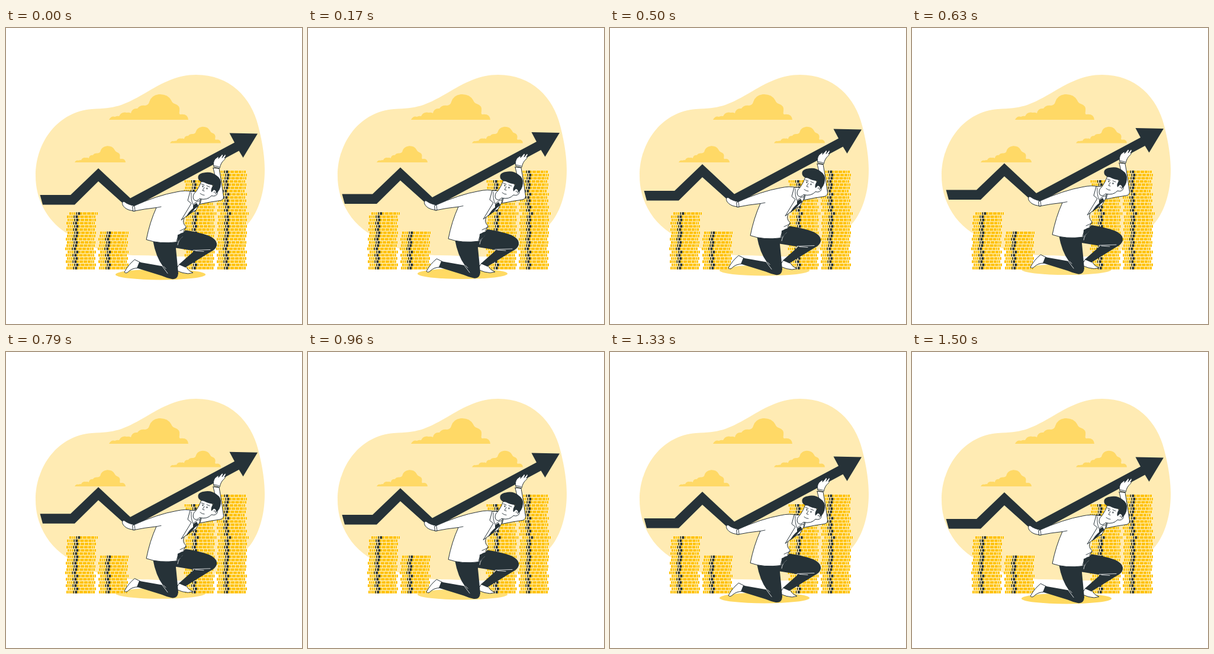
Write an HTML page that moves like this. It is 500 px wide and 500 px high and loops after 1540 ms.

```html
<!DOCTYPE html>
<html lang="en">
<head>
<meta charset="utf-8">
<title>Lifting the chart</title>
<style>
  html, body { margin: 0; width: 100%; height: 100%; overflow: hidden; background: #fff; }
  svg { display: block; width: 100%; height: 100%; }
  .dark { fill: #263238; }
  .skin { fill: #fff; stroke: #263238; stroke-width: 1; stroke-linejoin: round; stroke-linecap: round; }
  .line { fill: none; stroke: #263238; stroke-width: .9; stroke-linecap: round; stroke-linejoin: round; }
  .crease { fill: none; stroke: #fff; stroke-width: .8; stroke-linecap: round; }
</style>
</head>
<body>
<svg viewBox="0 0 500 500">
  <defs>
    <path id="cloud" d="M0 0Q4-7 10-5Q14-7 17-6Q21-14 30-12Q34-13 37-11Q39-20 48-19Q52-25 61-24Q67-25 68-30Q71-41 84-43Q99-44 105-33Q107-28 111-27Q121-24 119-14Q118-10 120-9Q133-11 134 0Z"/>
  </defs>

  <path fill="#ffebb3" d="M50 250C50 190 90 141 145 137C185 135 195 133 235 110C265 92 290 79 321 79C378 79 414 117 426 165C434 196 437 220 437 240C437 280 425 315 405 335C375 365 350 380 320 384C290 389 250 383 215 384C170 383 130 365 100 345C70 325 50 290 50 250Z"/>
  <g fill="#ffd966">
    <use href="#cloud" transform="translate(174 155)"/>
    <use href="#cloud" transform="translate(277 194.5) scale(.642)"/>
    <use href="#cloud" transform="translate(116 227) scale(.642)"/>
  </g>

  <ellipse id="shadow" cx="261" cy="416" rx="76" ry="9" fill="#ffd95f"/>
  <g id="coins"></g>

  <g id="lift">
    <path class="dark" d="M57.500 281.500H109L156 236.500L210 287L386 193L377.500 177L425 178L400.500 218.500L393.500 207L209 306L156 258.500L116 298H62Z"/>

    <!-- legs and feet -->
    <path class="skin" d="M217 391Q206 400 200 412Q203 415 207 411Q213 405 223 405L227 396Z"/>
    <path class="skin" d="M293 399L304 403Q308 410 316 413Q308 416 298 413L287 409Z"/>
    <path class="dark" d="M284 362L303 341Q340 347 349 354Q357 359 356 367Q354 374 345 378L303 404L292 399L318 376L287 371Z"/>
    <path class="dark" d="M248 358H288L287 372Q289 392 291 414Q290 425 280 423.500Q272 422 263 418L221 405L225 395L265 402Q253 386 248 358Z"/>
    <path class="crease" d="M264 402L273 414M266 402L270 406M290 366Q291 358 298 352M316 375L345 374M320 376L334 377"/>

    <!-- raised arm -->
    <path class="skin" d="M351 234Q349 227 353 221L358 217Q360 217 359 220L365 213Q368 213 365 219L370 213Q373 214 369 219Q372 219 368 223Q363 227 361 236Z"/>
    <path class="skin" d="M350 236L360 237Q364 258 367 281Q369 290 362 291Q346 293 328 297L322 283L354 272Q356 258 350 236Z"/>
    <path class="line" d="M350.500 232L360 234"/>

    <!-- jacket and lower arm -->
    <path class="skin" d="M217 300Q206 298 200 293Q196 292 196.500 297Q199 304 208 307L217 309Z"/>
    <path class="skin" d="M214 301Q256 282 288 276.500Q304 273 314 276L330 289L328 296Q313 307 301 320Q297 329 304 335L300 343L302 347L290 361Q259 365 237 357Q243 327 254 303Q234 305 215 309Z"/>
    <path class="line" d="M217 300L218 308.500M254 303L262 301.500M288 361Q289 352 296 346M305 337L294 342"/>
    <path class="dark" d="M290 349L301 344L303 347L289 361Z"/>
    <path class="skin" d="M311 276L307 291L313 296L296 324Q310 313 321 307L327 296L329 285L320 276Z"/>
    <path class="line" d="M313 278Q312 289 316 298L322 293L328 291"/>
    <path class="dark" d="M316 299L322 295L325 300L319 305Q313 313 304 319Q309 309 316 304Z"/>

    <!-- head -->
    <path class="skin" d="M331 256Q327 268 321 276Q314 281 317 289Q321 294 327 288Q340 291 347 283Q355 285 357 279Q358 272 351 271L346 258Z"/>
    <path class="dark" d="M325 255Q322 246 334 244Q347 241 356 249Q364 254 363 264Q362 274 355 279Q355 273 351 273L347 277Q345 272 350 265Q341 264 334 260Q328 260 325 255Z"/>
    <path class="line" d="M330 263L335 265M339 266L344 268M335 269L332 274L335 275M328 279Q331 282 335 282M351 277Q354 275 354 280"/>
    <ellipse class="dark" cx="332.500" cy="267" rx=".9" ry="1.500"/>
    <ellipse class="dark" cx="339.500" cy="270.500" rx=".9" ry="1.500"/>
  </g>
</svg>
<script>
  const LOOP = 1540, PHASE = 35, TRAVEL = 8.8, LOWEST = .5;
  const PITCH = 5.42, BASE = 408, WIDTH = 48, COIN = 4.3;
  const shifts = [0, 2, -1, 1, -1, 2, -2, 0, 1, -1, 1, 2, 0, 2, 0, 2, 1, 5];
  const YELLOW = '#ffc100', PALE = '#fff6dc', DARK = '#263238';
  const rect = (x, y, w, h, fill) =>
    `<rect x="${x}" y="${y}" width="${w}" height="${h}" fill="${fill}"/>`;

  function stack(left, rows) {
    let out = '';
    for (let i = 0; i < rows; i++) {
      const x = left + shifts[i % shifts.length];
      const y = BASE - (i + 1) * PITCH + .8;
      out += rect(x, y - .8, WIDTH, PITCH, PALE);
      out += rect(x, y, WIDTH, COIN, YELLOW);
      for (const tick of [2.5, 5.5, 9, 21, 28, 35, 41, 44])
        out += rect(x + tick + (i % 3) * .5, y, .9, COIN, PALE);
      out += rect(x + 11.5, y, 1.6, COIN, DARK);
      out += rect(x + 13.1, y, 1.4, COIN, PALE);
      out += rect(x + 14.5, y, 3.7, COIN, DARK);
    }
    return out;
  }

  document.getElementById('coins').innerHTML =
    stack(102, 18) + stack(157, 12) + stack(302.5, 28) + stack(357, 31);

  const lift = document.getElementById('lift');
  const shadow = document.getElementById('shadow');

  function draw(now) {
    const wave = (1 - Math.cos((now + PHASE) / LOOP * 2 * Math.PI)) / 2;
    const move = `translate(0 ${LOWEST - TRAVEL * wave})`;
    lift.setAttribute('transform', move);
    shadow.setAttribute('transform', move);
    shadow.setAttribute('opacity', 1 - .2 * wave);
    requestAnimationFrame(draw);
  }
  draw(performance.now());
</script>
</body>
</html>
```
